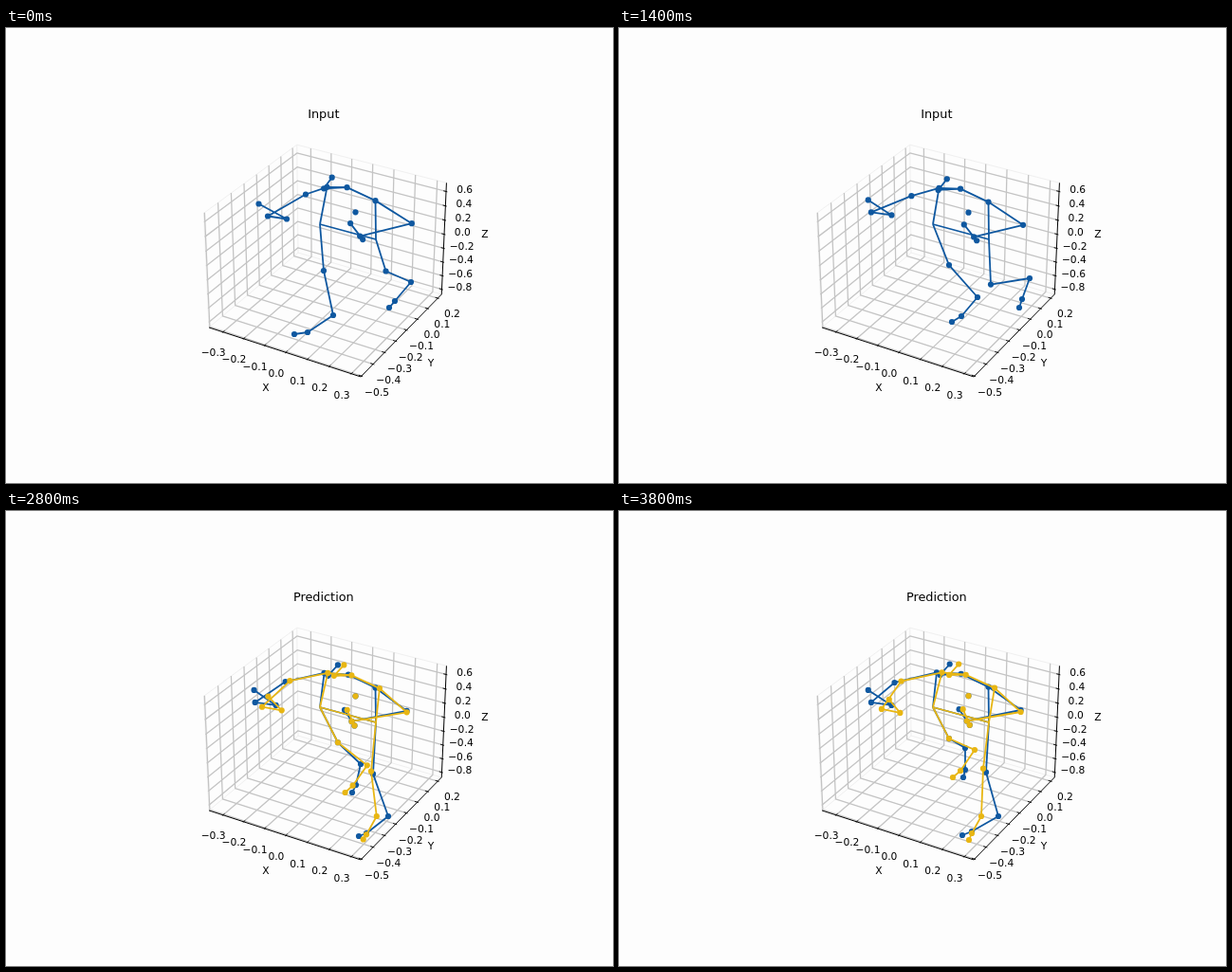
An HTML page with a canvas for the animation above (4000 ms loop, 640 by 480 pixels).

```html
<!DOCTYPE html>
<html lang="en">
<head>
<meta charset="utf-8">
<title>Pose prediction</title>
<style>
  html, body { margin: 0; width: 100%; height: 100%; overflow: hidden; background: #fdfdfd; }
  canvas { display: block; }
</style>
</head>
<body>
<canvas id="stage" width="640" height="480"></canvas>
<script>
const ctx = document.getElementById('stage').getContext('2d');
const STEP = 200, FRAMES = 20, FORECAST = 10;
const BLUE = '#0f58a0', GOLD = '#e8b613';
const { PI, sin, cos, sqrt, min } = Math;

// Perspective view of the unit box: elevation 30 degrees, azimuth -60 degrees.
function project([fx, fy, fz]) {
  const x = (fx - 0.5) * 1.143, y = (fy - 0.5) * 1.143, z = (fz - 0.5) * 0.857;
  const right = 0.866 * x + 0.5 * y;
  const up = -0.25 * x + 0.433 * y + 0.866 * z;
  const scale = 1604 / (10 - 0.433 * x + 0.75 * y - 0.5 * z);
  return [338.8 + right * scale, 239.9 - up * scale];
}

function polyline(points, color, width) {
  ctx.beginPath();
  points.forEach(p => ctx.lineTo(...p));
  ctx.strokeStyle = color;
  ctx.lineWidth = width;
  ctx.stroke();
}

function label(text, [x, y], size = 10.7) {
  ctx.font = `${size}px "DejaVu Sans", sans-serif`;
  ctx.fillStyle = '#000';
  ctx.fillText(text, x, y + size * 0.365);
}

const axes = [
  { name: 'X', at: [274, 379], min: -0.369, max: 0.342, first: -3, last: 3, step: 0.1,
    grid: f => [[f, 0, 0], [f, 1, 0], [f, 1, 1]],
    tick: f => [[f, -0.008, 0], [f, 0.017, 0]], text: f => [f, -0.105, -0.105],
    edge: [[0, 0, 0], [1, 0, 0]] },
  { name: 'Y', at: [448, 353], min: -0.5063, max: 0.2374, first: -5, last: 2, step: 0.1,
    grid: f => [[1, f, 0], [0, f, 0], [0, f, 1]],
    tick: f => [[1.008, f, 0], [0.983, f, 0]], text: f => [1.098, f, -0.098],
    edge: [[1, 0, 0], [1, 1, 0]] },
  { name: 'Z', at: [505, 217], min: -0.8756, max: 0.719, first: -4, last: 3, step: 0.2,
    grid: f => [[0, 0, f], [0, 1, f], [1, 1, f]],
    tick: f => [[1.008, 1, f], [0.983, 1, f]], text: f => [1.08, 1.08, f],
    edge: [[1, 1, 0], [1, 1, 1]] }
];

function eachTick(axis, draw) {
  for (let i = axis.first; i <= axis.last; i++) {
    const value = i * axis.step;
    draw((value - axis.min) / (axis.max - axis.min), value);
  }
}

function drawAxes() {
  const line = (points, color, width) => polyline(points.map(project), color, width);
  line([[0, 0, 0], [0, 0, 1], [0, 1, 1], [1, 1, 1]], '#f0f0f0', 1);
  line([[0, 0, 0], [0, 1, 0], [1, 1, 0]], '#f0f0f0', 1);
  line([[0, 1, 0], [0, 1, 1]], '#f0f0f0', 1);
  for (const axis of axes) eachTick(axis, f => line(axis.grid(f), '#c4c4c4', 1.3));
  for (const axis of axes) {
    line(axis.edge, '#000', 1);
    eachTick(axis, (f, value) => {
      line(axis.tick(f), '#000', 0.9);
      label(value.toFixed(1).replace('-0.0', '0.0').replace('-', '\u2212'), project(axis.text(f)));
    });
    label(axis.name, axis.at);
  }
}

const ease = t => (1 - cos(PI * min(1, t))) / 2;

// Smooth curve through points reached at the steps in KEYS.
const KEYS = [0, 3, 7, 10, 14, 19];
function follow(frame, ...points) {
  const last = KEYS.length - 1;
  let i = 0;
  while (i < last - 1 && frame >= KEYS[i + 1]) i++;
  const span = KEYS[i + 1] - KEYS[i], u = (frame - KEYS[i]) / span, v = 1 - u;
  return [0, 1].map(c => {
    const slope = k => (points[k + 1][c] - points[k][c]) / (KEYS[k + 1] - KEYS[k]);
    const tangent = k => {
      if (k === 0) return 2 * slope(0) - tangent(1);
      if (k === last) return 2 * slope(k - 1) - tangent(k - 1);
      const before = KEYS[k] - KEYS[k - 1], after = KEYS[k + 1] - KEYS[k];
      return (slope(k - 1) * after + slope(k) * before) / (before + after);
    };
    return points[i][c] * v * v * (1 + 2 * u) + points[i + 1][c] * u * u * (3 - 2 * u) +
      span * u * v * (v * tangent(i) - u * tangent(i + 1));
  });
}

// Torso and arms ride on a few slow waves; the lower legs follow their own curves.
function actualPose(f) {
  const nod = (1 - cos(PI * (f - 1.5) / 13.5)) / 2;
  const turn = ease(f / 19);
  const swing = sin(PI * f / 26);
  const lift = -0.5 - 4.5 * sin(PI * f / 11);
  const pull = 4.5 * sin(PI * (f + 1) / 11) - 3.5 * nod - 1;
  return {
    hipL: [331, 207],
    hipR: [390, 223],
    spine: [368.5, 194.3 + nod],
    neck: [359.5 + 1.5 * nod, 168 + 4.7 * nod],
    head: [335 + 4.5 * nod, 169.2 + 4.7 * nod],
    crown: [343.5 + 6.5 * nod, 157.5 + 5 * nod],

    shoulderL: [338.5 - 3.5 * turn, 167.7 + 3.3 * nod],
    elbowL: [316 - 25.5 * turn, 175.5 + 5.5 * turn],
    wristL: [276 - 13.5 * swing, 199 + lift],
    handL: [296 - 11.5 * swing, 202 + lift],
    thumbL: [266.5 - 5 * swing, 186 + lift],

    shoulderR: [389.5, 182 + 4.5 * nod],
    elbowR: [428 - 5.5 * nod, 206 + 5 * nod],
    wristR: [373 + pull, 219.5 + 2.5 * nod],
    handR: [376 + pull, 223 + 3.5 * nod],
    thumbR: [363 + 0.7 * pull, 206 + 4 * nod],

    kneeL: [335 + 15 * sqrt(swing), 256 - 0.84 * f],
    ankleL: follow(f, [345, 303], [365, 296], [378, 284], [375, 275], [374, 267], [365, 250]),
    footL: follow(f, [318, 321], [343, 315], [361, 304], [364, 297], [369, 289], [365, 273]),
    toeL: follow(f, [304, 323], [330, 319], [351, 310], [357, 304], [365, 297], [363, 281]),

    kneeR: [400.5 - 13.5 * ease(f / 12), 256.5 + 21 * sin(PI * f / 30)],
    ankleR: follow(f, [427, 268], [442, 260], [433, 264], [419, 288], [403, 322], [400, 322]),
    footR: follow(f, [410, 288], [427, 279], [425, 286], [411, 311], [380, 340], [372, 338]),
    toeR: follow(f, [404, 295], [421, 288], [422, 295], [409, 319], [372, 343], [362, 342])
  };
}

// How far the forecast has strayed from each joint by the end.
const drift = {
  neck: [5, 1], head: [9.5, 0], crown: [9.5, 0], shoulderL: [5.5, 0], elbowL: [7, -1.5],
  wristL: [11, 7], handL: [9, 8], thumbL: [22, 10], shoulderR: [6.5, 1], elbowR: [0, 2],
  thumbR: [4, 0], ankleL: [10, 2], footL: [-5, 1], toeL: [-11, 0],
  kneeR: [-3, -4], ankleR: [-18, 0], footR: [0, 2], toeR: [7, 5]
};

function forecastPose(f) {
  const pose = actualPose(f), grown = sin(PI * (f - 9.5) / 19);
  for (const name in drift) pose[name] = pose[name].map((value, c) => value + drift[name][c] * grown);
  return pose;
}

const limb = (side, names) => names.split(' ').map(name => name + side);
const chains = [
  ['hipL', 'shoulderL', 'neck', 'shoulderR', 'hipR', 'hipL'],
  ['neck', 'head', 'crown']
];
for (const side of ['L', 'R']) {
  chains.push(limb(side, 'shoulder elbow wrist hand thumb'), limb(side, 'hip knee ankle foot toe'));
}

function drawSkeleton(pose, color) {
  for (const chain of chains) polyline(chain.map(name => pose[name]), color, 1.8);
  ctx.fillStyle = color;
  for (const name in pose) {
    if (name.startsWith('hip')) continue;
    ctx.beginPath();
    ctx.arc(...pose[name], 3.1, 0, 2 * PI);
    ctx.fill();
  }
}

function draw() {
  const frame = Math.floor(performance.now() / STEP) % FRAMES;
  const predicting = frame >= FORECAST;
  ctx.fillStyle = '#fdfdfd';
  ctx.fillRect(0, 0, 640, 480);
  drawAxes();
  label(predicting ? 'Prediction' : 'Input', [334.8, 90], 12.85);
  drawSkeleton(actualPose(frame), BLUE);
  if (predicting) drawSkeleton(forecastPose(frame), GOLD);
  requestAnimationFrame(draw);
}

ctx.textAlign = 'center';
ctx.lineJoin = 'round';
draw();
</script>
</body>
</html>
```
